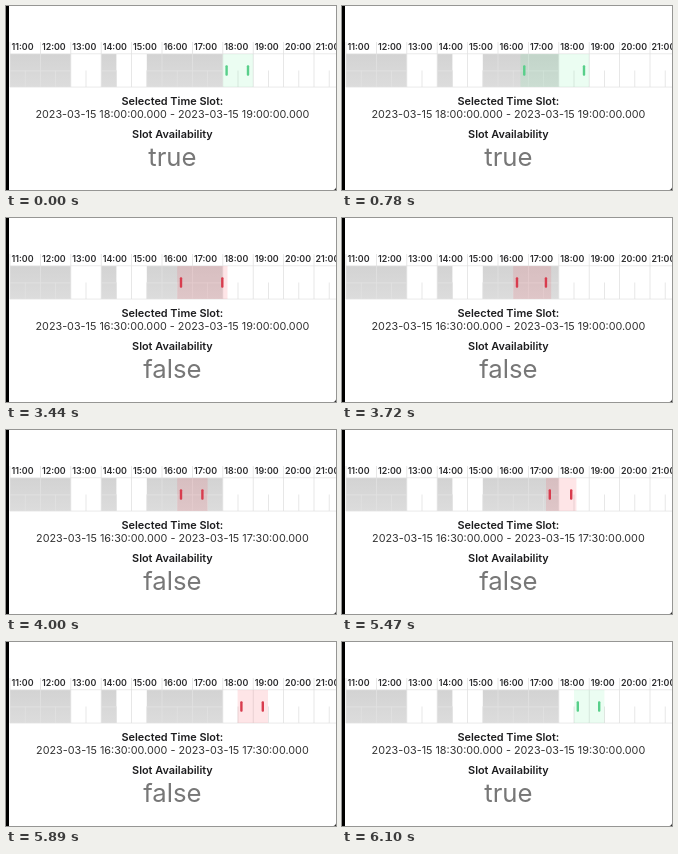
Recreate the animation shown at these times as an HTML page. Size 330x184 px, loop 8000 ms.

```html
<!DOCTYPE html>
<html lang="en">
<head>
<meta charset="utf-8">
<title>Time slot picker</title>
<style>
html, body { margin: 0; width: 100%; height: 100%; overflow: hidden; background: #fff; }
svg { display: block; width: 100vw; height: 100vh; font-family: Inter, "Liberation Sans", sans-serif; }
.hour { font-size: 8.9px; font-weight: 600; fill: #2c2c2e; }
.mid { text-anchor: middle; fill: #333; }
.head { font-size: 10.9px; font-weight: 600; fill: #1c1c1e; }
.range { font-size: 10.8px; }
.answer { font-size: 25.7px; fill: #777; }
</style>
</head>
<body>
<svg viewBox="0 0 330 184" preserveAspectRatio="none">
  <defs>
    <linearGradient id="busy" x1="0" y1="0" x2="0" y2="1">
      <stop offset="0" stop-color="#d3d3d3"/>
      <stop offset="1" stop-color="#dcdcdc"/>
    </linearGradient>
  </defs>
  <rect width="330" height="184" fill="#fff"/>
  <g id="grid"></g>
  <rect id="fill" y="48" height="33"/>
  <rect id="left" y="59.3" width="2.4" height="10.4" rx="1"/>
  <rect id="right" y="59.3" width="2.4" height="10.4" rx="1"/>
  <rect width="3" height="184" fill="#000"/>
  <path d="M330 181.5V184H327.5Q329.5 183.5 330 181.5Z" fill="#222"/>
  <text class="mid head" x="166.4" y="99">Selected Time Slot:</text>
  <text class="mid range" id="range" x="166.4" y="111.5"></text>
  <text class="mid head" x="166.4" y="132">Slot Availability</text>
  <text class="mid answer" id="answer" x="166.4" y="160"></text>
</svg>
<script>
const LOOP = 8000, STEP = 70, HOUR = 30.4;
const $ = id => document.getElementById(id);
const xOf = h => 4 + (h - 11) * HOUR;

function add(tag, attrs, text) {
  const el = document.createElementNS('http://www.w3.org/2000/svg', tag);
  for (const k in attrs) el.setAttribute(k, attrs[k]);
  if (text) el.textContent = text;
  $('grid').append(el);
}

const line = (x, y, width, height, fill) => add('rect', { x, y, width, height, fill });

for (const [a, b] of [[11, 13], [14, 14.5], [15.5, 18]]) {
  line(xOf(a), 48, (b - a) * HOUR, 33, 'url(#busy)');
  line(xOf(a), 64.5, (b - a) * HOUR, 0.7, '#e4e4e4');
}
line(4, 47.5, 326, 0.7, '#e2e2e2');
line(4, 80.7, 326, 0.7, '#e2e2e2');
for (let h = 11; h <= 21; h++) {
  line(xOf(h) - 0.4, 36, 0.8, 45, '#e2e2e2');
  line(xOf(h + 0.5) - 0.4, 64.5, 0.8, 16.5, '#e2e2e2');
  add('text', { class: 'hour', x: xOf(h) + 1.5, y: 44 }, h + ':00');
}

// Committed slots: start time, from hour, to hour, free
const slots = [
  [0, 18, 19, true],
  [1060, 16.5, 19, false],
  [4000, 16.5, 17.5, false],
  [6100, 18.5, 19.5, true]
];

// Drags: begin, end, settle, moved edges, first and last x of the first moved edge
const drags = [
  [500, 990, 1060, 'l', 209, 171.6],
  [3440, 3860, 4000, 'r', 221.5, 207.6],
  [5470, 5890, 6100, 'lr', 204, 231.6]
];

const clock = h => `2023-03-15 ${Math.floor(h)}:${h % 1 ? '30' : '00'}:00.000`;
const easeOut = p => 1 - (1 - p) ** 2;

function pose(t) {
  const [, from, to, free] = slots.filter(s => s[0] <= t).pop();
  let l = xOf(from), r = xOf(to);
  const drag = drags.find(d => t >= d[0] && t < d[2]);
  if (drag) {
    const [begin, end, , edges, a, b] = drag;
    const held = Math.floor((t - begin) / STEP) * STEP;
    const x = a + (b - a) * easeOut(Math.min(1, held / (end - begin)));
    if (edges === 'lr') { r += x - l; l = x; }
    else if (edges === 'l') l = x;
    else r = x;
  }
  return { l, r, from, to, free };
}

function setText(id, text) {
  if ($(id).textContent !== text) $(id).textContent = text;
}

function draw(t) {
  const { l, r, from, to, free } = pose(t);
  $('fill').setAttribute('x', l);
  $('fill').setAttribute('width', r - l);
  $('fill').setAttribute('fill', free ? 'rgba(0,230,90,.08)' : 'rgba(240,20,40,.11)');
  $('left').setAttribute('x', l + 2.6);
  $('right').setAttribute('x', r - 6.4);
  for (const id of ['left', 'right']) $(id).setAttribute('fill', free ? '#58cf8a' : '#d83c4e');
  setText('range', clock(from) + ' - ' + clock(to));
  setText('answer', String(free));
}

const start = performance.now();
function tick() {
  draw((performance.now() - start) % LOOP);
  requestAnimationFrame(tick);
}
tick();
</script>
</body>
</html>
```
